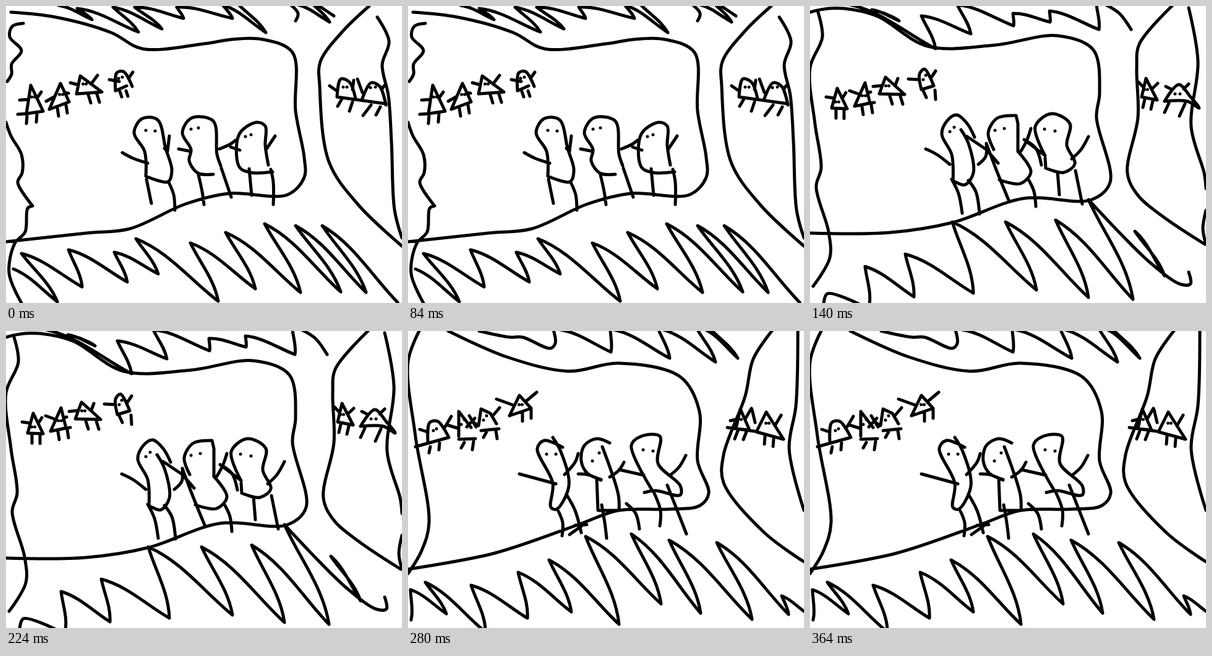
Write an HTML page that moves like this. It is 640x480 px and loops after 420 ms.

```html
<!DOCTYPE html>
<html lang="en">
<head>
<meta charset="utf-8">
<title>Cave crowd</title>
<style>
  html, body { margin: 0; width: 100%; height: 100%; overflow: hidden; background: #fff; }
  svg { display: block; width: 100vw; height: 100vh; }
  path { fill: none; stroke: #000; stroke-width: 5; stroke-linecap: round; stroke-linejoin: round; }
</style>
</head>
<body>
<svg viewBox="0 0 640 480"><path id="ink"/></svg>
<script>
const POSE_MS = 140;
let d = "";

const pairs = flat => flat.flatMap((x, i) => i % 2 ? [] : [{ x, y: flat[i + 1] }]);
const lerp = (p, q, t) => ({ x: p.x + (q.x - p.x) * t, y: p.y + (q.y - p.y) * t });
const xy = p => `${p.x.toFixed(1)} ${p.y.toFixed(1)} `;
const dot = (x, y) => { d += `M${x} ${y}h.01`; };
const polyline = points => { d += "M" + points.map(xy).join("L"); };
const line = (...flat) => polyline(pairs(flat));

// Bézier handle at p towards `to` on a centripetal Catmull-Rom curve.
function handle(from, p, to) {
  if (!from) return p;
  const a = Math.sqrt(Math.hypot(p.x - from.x, p.y - from.y));
  const b = Math.sqrt(Math.hypot(to.x - p.x, to.y - p.y));
  const mix = k => (a * a * to[k] - b * b * from[k]
    + (2 * a * a + 3 * a * b + b * b) * p[k]) / (3 * a * (a + b));
  return { x: mix("x"), y: mix("y") };
}

function curve(...flat) {
  const points = pairs(flat);
  d += "M" + xy(points[0]);
  points.slice(1).forEach((p, i) => {
    d += "C" + xy(handle(points[i - 1], points[i], p)) + xy(handle(points[i + 2], p, points[i])) + xy(p);
  });
}

// Scribble through sharp corners; every stroke bulges to the upper right at its start.
function zigzag(...flat) {
  const points = pairs(flat);
  d += "M" + xy(points[0]);
  points.slice(1).forEach((p, i) => {
    const last = points[i], bend = 0.09 * Math.sign(p.y - last.y);
    const start = lerp(last, p, 1 / 3);
    start.x += (p.y - last.y) * bend;
    start.y -= (p.x - last.x) * bend;
    d += "C" + xy(start) + xy(lerp(last, p, 2 / 3)) + xy(p);
  });
}

// Small triangle creature: its arms meet the sides halfway, its legs hang from the base.
function critter(triangle, eyes, hands, legs, lean) {
  const [left, top, right] = pairs(triangle);
  polyline([left, top, right, left]);
  dot(eyes[0] - 2.5, eyes[1]);
  dot(eyes[0] + 2.5, eyes[1]);
  pairs(hands).forEach((hand, i) => polyline([hand, lerp(top, i ? right : left, 0.5)]));
  for (const x of legs) {
    const y = lerp(left, right, (x - left.x) / (right.x - left.x)).y + 3;
    line(x, y, x + lean, y + 13);
  }
}

function poseA() {
  curve(28,28, 10,33, 6,50, 25,72, 9,94, 9,110, 2,122);
  curve(0,188, 8,210, 25,240, 26,270, 19,285, 43,323);
  curve(43,323, 35,327, 31,365, 14,384, 5,432, 25,480);
  curve(8,10, 80,18, 170,43, 220,69, 320,61, 365,54, 415,54, 463,75, 468,170, 482,245, 482,277, 455,305,
    360,303, 290,320, 200,360, 130,367, 0,381);
  curve(587,0, 545,40, 508,90, 507,130, 522,252, 570,322, 640,388);
  curve(600,18, 619,57, 608,95, 618,145, 623,220, 628,330, 640,375);

  zigzag(85,-1, 139,22, 115,4, 214,42, 173,2, 252,37, 208,2, 287,20, 276,2, 366,20, 350,-2, 420,43, 376,-2);
  curve(460,-2, 472,12, 468,24);
  zigzag(472,-2, 523,26, 497,-2);
  line(503,-2, 530,16);
  zigzag(12,425, 83,478, 25,400, 123,454, 101,394, 196,446, 175,398, 246,433, 210,376, 343,477, 298,383,
    403,457, 355,366, 476,463, 418,352, 541,462, 468,355, 582,463, 511,355, 633,479);

  curve(226,275, 224,235, 207,205, 220,182, 245,184, 258,230, 268,265, 262,284, 226,275);
  dot(226,201); dot(241,202);
  curve(188,237, 205,246, 229,254); line(264,210, 261,235, 256,230);
  line(227,280, 235,319); curve(263,285, 271,305, 273,330);

  curve(335,272, 310,270, 296,250, 299,232, 285,205, 300,181, 335,186, 341,240, 347,258);
  dot(299,199); dot(311,197);
  line(279,231, 299,235); curve(371,217, 363,223, 345,231);
  curve(311,273, 317,300, 320,321); line(348,262, 364,309);

  curve(431,268, 395,269, 377,260, 377,207, 405,188, 419,194, 419,225, 424,257);
  dot(387,211); dot(396,208);
  line(363,228, 378,233); line(435,210, 421,231);
  line(393,263, 397,306); curve(428,264, 432,285, 432,321);

  critter([33,174, 40,128, 60,170], [44,147], [22,152, 57,139], [34,50], -1);
  line(19,175, 34,174);
  critter([70,167, 88,125, 102,155], [89,143], [65,154, 101,141], [83,97], 2);
  critter([114,142, 120,113, 155,139], [127,126], [104,124, 148,112], [133,147], 4);
  curve(177,137, 179,108, 190,106, 204,130); line(177,137, 195,129);
  dot(182,117); dot(188,115);
  line(167,119, 183,122); line(205,107, 198,117);
  line(184,138, 187,147); line(194,137, 197,146);
  curve(535,147, 541,118, 555,123, 565,150); line(535,147, 614,158);
  dot(545,131); dot(551,131);
  line(523,129, 533,136); line(562,120, 560,135);
  line(543,150, 536,162); line(560,155, 555,170);
  curve(575,152, 590,124, 604,130, 614,160);
  dot(589,132); dot(597,131);
  line(568,118, 576,140); line(611,129, 607,135);
  line(590,160, 577,177); line(605,163, 598,176);
}

function poseB() {
  curve(13,10, 20,50, 0,100, 8,190, 18,262, 10,292, 30,365, 32,407, 5,453);
  curve(0,10, 30,4, 70,6, 110,17, 190,65, 300,63, 400,48, 458,71, 468,140, 463,180, 485,285, 455,313,
    345,311, 230,350, 130,366, 0,367);
  curve(585,0, 532,62, 528,100, 530,180, 513,270, 530,306, 570,340, 638,385);
  curve(612,3, 627,90, 616,195, 637,270, 640,295);
  curve(640,330, 635,360, 640,385);

  zigzag(65,-2, 203,69, 180,16, 260,45, 238,-2, 329,32, 328,12, 388,26, 387,8, 467,38, 463,-2);
  curve(478,-2, 500,12, 519,38);
  zigzag(100,6, 144,24, 118,11);
  curve(22,482, 28,465, 80,482);
  zigzag(96,482, 89,421, 168,470, 154,401, 264,464, 230,349, 366,459, 316,349, 450,471, 397,346, 522,474, 450,313);
  curve(450,313, 550,415, 600,450, 615,449, 612,430);
  zigzag(573,436, 525,364, 573,436);

  curve(231,284, 229,240, 213,207, 222,185, 237,176, 254,190, 266,212);
  curve(244,200, 256,222, 264,270, 250,289, 231,282);
  dot(226,203); dot(233,196);
  curve(187,231, 205,240, 226,256); line(254,211, 285,232, 304,254); curve(272,256, 284,243, 285,222);
  curve(229,280, 240,303, 246,335); curve(256,282, 268,300, 274,336);

  curve(297,232, 288,205, 303,181, 333,177);
  line(333,177, 336,190, 336,235);
  curve(336,235, 357,268, 340,287, 306,281);
  dot(299,201); dot(314,198);
  curve(285,222, 300,262, 322,316); curve(340,236, 350,218, 357,198); curve(354,282, 362,300, 365,324);

  line(380,246, 381,262);
  curve(381,262, 410,269, 428,255, 415,225, 420,190, 390,174, 364,195, 380,242);
  dot(379,199); dot(396,202);
  line(379,241, 346,216); curve(346,216, 365,230, 374,257); curve(450,211, 438,232, 423,247);
  line(400,268, 403,305); line(429,266, 440,320);

  critter([35,165, 44,133, 60,166], [44,155], [26,147, 58,140], [42,55], 0);
  critter([72,162, 89,124, 97,157], [87,145], [64,137, 98,139], [84,99], 2);
  line(90,158, 104,156);
  critter([112,142, 122,115, 153,143], [125,129], [102,130, 142,117], [129,146], 4);
  curve(180,135, 177,110, 185,102, 200,129); line(200,129, 180,135);
  dot(183,119); dot(187,112);
  line(159,118, 177,119); line(203,105, 195,117);
  line(183,137, 188,148); line(202,136, 203,151);
  critter([536,147, 543,117, 561,152], [543,135], [531,123, 562,125], [541,554 - 0], -3);
  curve(573,154, 596,127, 615,147, 629,165, 610,154, 573,154);
  dot(590,142); dot(598,142);
  line(575,130, 585,135); line(612,126, 604,134);
  line(580,157, 573,172); line(606,158, 597,178);
}

function poseC() {
  curve(18,0, 0,50, 12,170, 34,310, 22,355, 0,392);
  curve(65,0, 160,42, 260,65, 340,52, 440,74, 471,130, 468,210, 486,262, 472,282, 420,288, 340,290,
    275,313, 140,359, 0,385);
  curve(588,0, 558,45, 545,105, 510,200, 510,245, 575,325, 640,373);
  curve(630,0, 627,120, 616,190, 640,290);

  curve(115,0, 165,10, 185,10, 230,28, 238,20, 235,-2);
  zigzag(246,-2, 328,34, 327,-2);
  zigzag(333,-2, 423,44, 405,-2);
  zigzag(413,-2, 497,50, 468,-2);
  zigzag(481,-2, 533,44, 490,-2);
  zigzag(5,467, 4,418, 62,457, 28,406, 120,482);
  zigzag(125,482, 102,411, 193,464, 178,390, 264,454, 228,370, 341,474, 287,332, 409,441, 361,328,
    473,456, 422,338, 556,466, 499,342, 615,458, 604,428, 640,453);

  curve(250,188, 220,177, 209,190, 234,246, 231,285, 240,288, 260,250, 247,195, 234,172);
  dot(224,199); dot(239,199);
  line(180,231, 239,247); curve(275,198, 270,212, 253,232);
  curve(243,291, 250,310, 249,331); curve(256,264, 270,290, 280,326);
  line(261,329, 285,312); line(289,313, 270,314);

  curve(326,181, 305,174, 285,185, 280,210, 290,230, 312,240);
  line(305,238, 307,290, 341,290);
  curve(341,290, 340,265, 314,187);
  dot(298,210); dot(309,197);
  curve(275,231, 290,232, 312,241); curve(349,212, 341,225, 326,236);
  curve(313,281, 318,310, 321,335); curve(353,279, 368,295, 374,320);

  curve(382,261, 400,258, 440,265, 440,250, 404,214, 407,170, 375,171, 361,185, 395,258);
  dot(380,192); dot(396,194);
  line(341,224, 381,233); curve(449,201, 438,220, 425,232);
  curve(396,258, 408,290, 407,315); line(419,249, 450,328);

  curve(32,178, 35,148, 48,146, 66,172); line(66,172, 12,187);
  dot(41,161); dot(46,158);
  line(19,159, 31,163); line(70,138, 58,158);
  line(36,187, 34,197); line(51,181, 50,192);
  line(82,170, 82,130, 102,156); line(64,152, 80,157); line(82,175, 109,174);
  dot(86,151); dot(91,143);
  line(99,137, 110,155); line(108,141, 95,155);
  line(91,180, 86,189); line(106,178, 104,192);
  line(114,153, 118,126, 133,133, 143,150); line(118,161, 147,158);
  dot(122,144); dot(127,137);
  line(104,146, 112,152); line(148,124, 137,137);
  line(127,163, 122,172); line(142,161, 144,174);
  critter([164,137, 180,104, 199,125], [182,119], [143,110, 208,99], [185,199], 0);
  critter([530,158, 537,126, 552,160], [536,143], [521,145, 555,125], [533,547], -5);
  line(516,156, 560,162); line(556,127, 561,148);
  critter([563,163, 579,131, 607,175], [581,149], [579,131, 603,136], [577,591], -1);
}

const drawings = [poseA, poseB, poseC].map(draw => {
  d = "";
  draw();
  return d;
});

const ink = document.getElementById("ink");
const startTime = performance.now();
let shown = -1;

function update(now) {
  const index = Math.floor(Math.max(0, now - startTime) / POSE_MS) % drawings.length;
  if (index !== shown) ink.setAttribute("d", drawings[shown = index]);
  requestAnimationFrame(update);
}
update(startTime);
</script>
</body>
</html>
```
